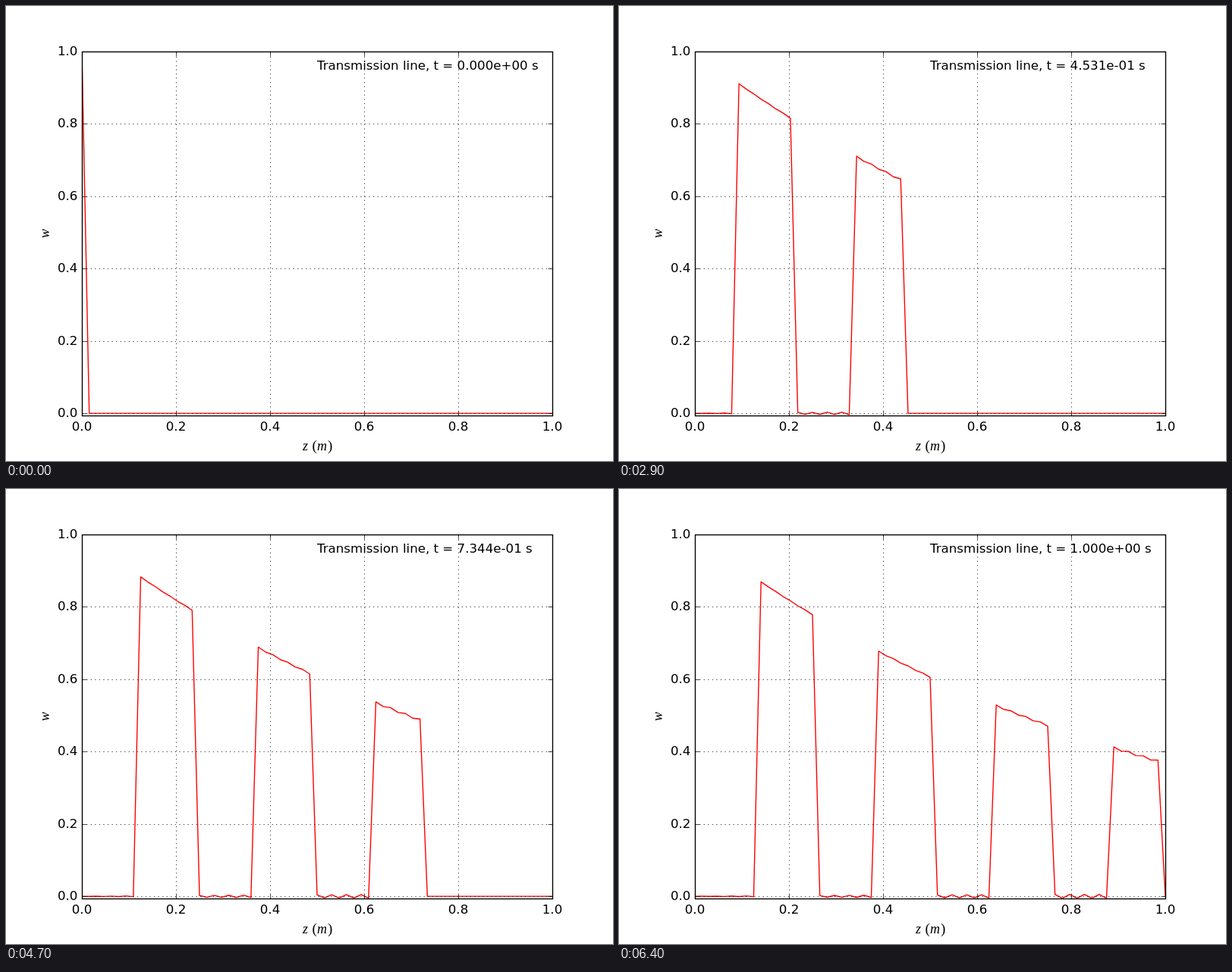
Write an HTML page that moves like this. It is 800 px wide and 600 px high and loops after 6.5 s.

```html
<!DOCTYPE html>
<html lang="en">
<head>
<meta charset="utf-8">
<title>Transmission line</title>
<style>
  html, body { margin: 0; width: 100%; height: 100%; overflow: hidden; background: #fff; }
  svg { display: block; width: 800px; height: 600px; }
  text { font: 16.667px "DejaVu Sans", sans-serif; }
  .math text { font: italic 18px "Liberation Serif", serif; }
  .math .paren { font-style: normal; font-size: 19px; }
  .grid { stroke: #000; stroke-width: .694; stroke-dasharray: 1.389 4.167; }
  .tick { stroke: #000; stroke-width: .694; }
</style>
</head>
<body>
<svg viewBox="0 0 800 600">
  <clipPath id="area"><rect x="100" y="60" width="620" height="480"/></clipPath>
  <path id="curve" clip-path="url(#area)" fill="none" stroke="#f00" stroke-width="1.389"
        stroke-linejoin="round" stroke-linecap="square"/>
  <g id="axes"></g>
  <rect x="100.5" y="60.5" width="620" height="480" fill="none" stroke="#000" stroke-width="1.389"/>
  <g class="math">
    <text x="391" y="586">z</text>
    <text class="paren" x="403.5" y="586">(</text>
    <text x="410" y="586">m</text>
    <text class="paren" x="424" y="586">)</text>
    <text transform="translate(57 300) rotate(-90)" text-anchor="middle">w</text>
  </g>
  <text id="label" x="410" y="84"></text>
</svg>
<script>
const CELLS = 64, DT = 1 / CELLS, STEP_MS = 100, Y_MIN = -0.006;
const px = z => 100 + 620 * z;
const py = w => 60 + 480 * (1 - w) / (1 - Y_MIN);
const snap = v => Math.round(v) + 0.5;
const $ = id => document.getElementById(id);

function add(tag, attrs, text = '') {
  const el = document.createElementNS('http://www.w3.org/2000/svg', tag);
  for (const key in attrs) el.setAttribute(key, attrs[key]);
  el.textContent = text;
  $('axes').append(el);
}

function drawAxes() {
  for (let i = 0; i <= 5; i++) {
    const v = i / 5, x = snap(px(v)), y = snap(py(v)), name = v.toFixed(1);
    if (i > 0 && i < 5) {
      add('path', { class: 'grid', d: `M${x} 540.5V60.5` });
      add('path', { class: 'tick', d: `M${x} 540.5v-6M${x} 60.5v6` });
    }
    if (i < 5) {
      add('path', { class: 'grid', d: `M100.5 ${y}H720.5` });
      add('path', { class: 'tick', d: `M100.5 ${y}h6M720.5 ${y}h-6` });
    }
    add('text', { x: px(v), y: 560, 'text-anchor': 'middle' }, name);
    add('text', { x: 94.4, y: Math.round(py(v)) + 5, 'text-anchor': 'end' }, name);
  }
}

// Square wave fed in at the left end; it stays low on the last step.
const source = n => n < CELLS && n % 16 < 8 ? 1 : 0;

// Leapfrog scheme for w_tt + 2 w_t + w = w_zz at Courant number 1.
function solve() {
  const first = Array(CELLS + 1).fill(0);
  first[0] = 1;
  const rows = [first, first.slice()];
  for (let n = 2; n <= CELLS; n++) {
    const u = rows[n - 1], old = rows[n - 2], next = Array(CELLS + 1).fill(0);
    next[0] = source(n);
    for (let j = 1; j < CELLS; j++) {
      next[j] = (u[j - 1] + u[j + 1] - (1 - DT) * old[j] - DT * DT * u[j]) / (1 + DT);
    }
    rows.push(next);
  }
  return rows;
}

// Scientific notation with three decimals, ties rounded to even.
function sci(t) {
  const e = t ? Math.floor(Math.log10(t)) : 0;
  const v = t * 10 ** (3 - e);
  let m = Math.round(v);
  if (m - v === 0.5 && m % 2) m--;
  return `${(m / 1000).toFixed(3)}e${e < 0 ? '-' : '+'}0${Math.abs(e)}`;
}

const rows = solve();
let shown = -1;

function render(ms) {
  const n = Math.floor(ms / STEP_MS) % rows.length;
  if (n === shown) return;
  shown = n;
  const points = rows[n].map((w, j) => `${px(j * DT)} ${py(w).toFixed(3)}`);
  $('curve').setAttribute('d', 'M' + points.join('L'));
  $('label').textContent = `Transmission line, t = ${sci(n * DT)} s`;
}

drawAxes();
const start = performance.now();
function tick() {
  render(performance.now() - start);
  requestAnimationFrame(tick);
}
tick();
</script>
</body>
</html>
```
